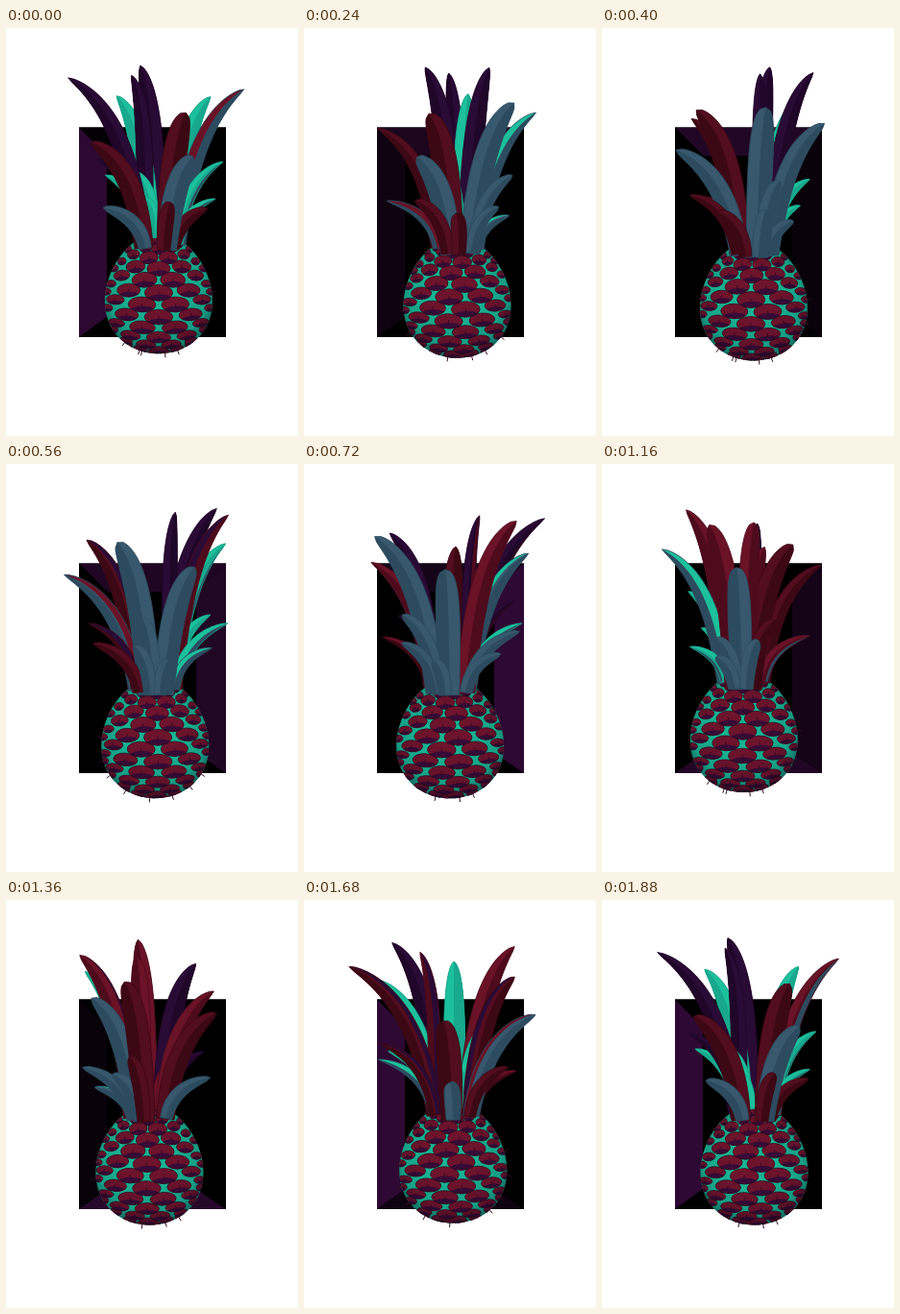
Animation, 304 px wide and 425 px high, one loop 1920 ms. Source, as an HTML page with a canvas:

```html
<!DOCTYPE html>
<html lang="en">
<head>
<meta charset="utf-8">
<title>Pineapple</title>
<style>
html, body { margin: 0; width: 100%; height: 100%; overflow: hidden; background: #fff; }
canvas { display: block; width: 304px; height: 425px; }
</style>
</head>
<body>
<canvas id="stage" width="304" height="425"></canvas>
<script>
const ctx = document.getElementById('stage').getContext('2d');
const LOOP = 1920, STEP = 40, TAU = Math.PI * 2;
const { sin, cos, abs, min, max, PI, hypot } = Math;
const rad = d => d * PI / 180;
const clamp = (v, a, b) => min(b, max(a, v));
const wave = (t, peak) => cos((t - peak) / LOOP * TAU);

const C = {
  red: ['#6a1226', '#4e0b1c'],
  dark: ['#520d1e', '#3c0814'],
  purple: ['#2a0b36', '#200629'],
  teal: ['#1cc09c', '#17a88d'],
  blue: ['#37586d', '#2d4b5f']
};

// start angle, reach, tip height, tip sway, width, inner face, outer face
const leaves = [
  [209, 106, 63, 23, 27, 'purple', 'dark'],
  [260, 79, 52, 13, 28, 'purple', 'red'],
  [5, 95, 62, 21, 29, 'red', 'blue'],
  [62, 68, 76, 14, 30, 'purple', 'dark'],
  [222, 31, 54, 7, 23, 'purple', 'red'],
  [140, 77, 106, 20, 28, 'dark', 'dark'],
  [65, 91, 111, 25, 27, 'red', 'blue'],
  [318, 89, 87, 23, 28, 'teal', 'blue'],
  [240, 82, 88, 20, 27, 'teal', 'blue'],
  [352, 76, 142, 19, 20, 'teal', 'blue'],
  [225, 75, 166, 18, 18, 'teal', 'blue'],
  [0, 66, 178, 12, 17, 'teal', 'blue'],
  [40, 70, 179, 14, 18, 'red', 'dark'],
  [135, 66, 180, 10, 19, 'red', 'blue'],
  [255, 79, 166, 17, 19, 'teal', 'blue'],
  [212, 72, 146, 18, 18, 'purple', 'dark'],
  [75, 66, 166, 16, 18, 'purple', 'dark'],
  [262, 62, 190, 13, 17, 'teal', 'blue'],
  [330, 62, 192, 13, 17, 'teal', 'blue']
];

function path(pts) {
  ctx.beginPath();
  for (const [x, y] of pts) ctx.lineTo(x, y);
  ctx.closePath();
}

function quad(color, ...pts) {
  path(pts);
  ctx.fillStyle = color;
  ctx.fill();
}

function drawRoom(t) {
  const L = 76, T = 103.5, R = 229, B = 322;
  const l = 105, u = 133, r = 198, d = 301;
  const tint = (peak, power) => {
    const k = max(0, wave(t, peak)) * power;
    return `rgb(${48 * k},${10 * k},${54 * k})`;
  };
  ctx.fillStyle = '#000';
  ctx.fillRect(L, T, R - L, B - T);
  quad(tint(440, 0.7), [L, T], [R, T], [r, u], [l, u]);
  quad(tint(1320, 0.8), [L, B], [R, B], [r, d], [l, d]);
  quad(tint(1780, 1), [L, T], [l, u], [l, d], [L, B]);
  quad(tint(820, 1), [R, T], [r, u], [r, d], [R, B]);
}

function drawSpike(x, y, dx, dy) {
  ctx.beginPath();
  ctx.moveTo(x, y);
  ctx.lineTo(x + dx, y + dy);
  ctx.strokeStyle = '#35091f';
  ctx.lineWidth = 1;
  ctx.stroke();
}

function drawScale({ x, y, w, h, n, nx, tilt }) {
  const disc = () => {
    ctx.beginPath();
    ctx.ellipse(x, y, w, h, tilt, 0, TAU);
  };
  disc();
  ctx.fillStyle = '#6e132c';
  ctx.fill();
  ctx.save();
  ctx.clip();
  ctx.beginPath();
  ctx.ellipse(x + w * 0.1, y + h * 1.2, w * 1.15, h, tilt, 0, TAU);
  ctx.fillStyle = '#370b36';
  ctx.fill();
  ctx.restore();
  disc();
  ctx.strokeStyle = '#2a0719';
  ctx.lineWidth = 0.7;
  ctx.stroke();
  if (n > 0.35) drawSpike(x, y - 1, nx * 2, 3);
}

function drawBody(cx, cy, turn) {
  const rx = 55, ry = 62, pitch = 0.23, PER_ROW = 10;
  const cp = cos(pitch), sp = sin(pitch);
  const egg = v => rx * (1 + 0.13 * v);
  const scales = [];
  for (let row = 0; row < 13; row++) {
    const lat = rad(-70 + row * 12);
    for (let i = 0; i < PER_ROW; i++) {
      const a = turn + (i + (row % 2) / 2) * TAU / PER_ROW;
      const px = cos(a) * cos(lat), pz = sin(a) * cos(lat), py = sin(lat);
      const n = pz * cp + py * sp;
      const sy = -py * cp + pz * sp;
      if (n < -0.05) continue;
      scales.push({
        x: cx + egg(sy) * px, y: cy + ry * sy, n, nx: px, ny: sy,
        w: 14 * cos(lat) * max(0.3, sin(a)) + 1,
        h: 8.2 * max(0.45, hypot(n, 0.25)),
        tilt: -px * sy * 0.5,
        spike: i % 2 === row % 2
      });
    }
  }
  scales.sort((p, q) => p.n - q.n);

  const outline = grow => {
    const pts = [];
    for (let a = 0; a < TAU; a += 0.05) {
      pts.push([cx + (egg(sin(a)) + grow) * cos(a), cy + (ry + grow) * sin(a)]);
    }
    path(pts);
  };

  for (const s of scales) {
    if (s.spike && s.n < 0.25 && s.ny > -0.4) {
      const ex = cx + egg(s.ny) * s.nx / hypot(s.nx, s.ny);
      const ey = cy + ry * s.ny / hypot(s.nx, s.ny);
      drawSpike(ex, ey, s.nx * 5, s.ny * 5);
    }
  }
  ctx.save();
  outline(0.5);
  ctx.fillStyle = '#18b494';
  ctx.fill();
  ctx.clip();
  scales.forEach(drawScale);
  const shade = ctx.createRadialGradient(cx - 4, cy - 8, 26, cx, cy, 66);
  shade.addColorStop(0, 'rgba(10,0,20,0)');
  shade.addColorStop(0.65, 'rgba(10,0,20,.12)');
  shade.addColorStop(1, 'rgba(10,0,20,.5)');
  outline(1);
  ctx.fillStyle = shade;
  ctx.fill();
  ctx.restore();
}

function drawLeaf([start, reach, tipY, sway, width, inner, outer], bx, by, turn) {
  const a = rad(start) + turn, c = cos(a), s = sin(a);
  const front = max(0, s);
  const far = reach * c * (1 + 0.12 * s);
  const x0 = bx + 20 * c, y0 = by + 7 * s;
  const x2 = 152 + far, y2 = tipY + sway * s;
  const x1 = bx + far * 0.3 + 6 * c, y1 = y0 + (y2 - y0) * 0.8;
  const half = width / 2 * (0.72 + 0.28 * abs(s));
  const N = 24, left = [], mid = [], right = [], split = [];
  const inPart = clamp(0.58 - s * 1.15, 0, 1);
  const side = c >= 0 ? 1 : -1;

  for (let i = 0; i <= N; i++) {
    const k = i / N, m = 1 - k;
    const x = m * m * x0 + 2 * m * k * x1 + k * k * x2;
    const y = m * m * y0 + 2 * m * k * y1 + k * k * y2;
    const tx = m * (x1 - x0) + k * (x2 - x1);
    const ty = m * (y1 - y0) + k * (y2 - y1);
    const len = hypot(tx, ty) || 1;
    const w = half * (0.75 + 0.95 * k) * Math.pow(m, 0.72 - 0.25 * front);
    const nx = ty / len * w * side, ny = -tx / len * w * side;
    const at = q => [x + nx * q, y + ny * q];
    left.push(at(1));
    right.push(at(-1));
    mid.push(at(0.05));
    split.push(at(1 - 2 * inPart));
  }
  const strip = (p, q) => path(p.concat([...q].reverse()));
  const fill = color => { ctx.fillStyle = color; ctx.fill(); };

  strip(left, right);
  fill(C[outer][0]);
  strip(mid, right);
  fill(C[outer][1]);
  if (inPart > 0) {
    strip(left, split);
    fill(C[inner][0]);
    if (inPart > 0.6) {
      strip(mid, split);
      fill(C[inner][1]);
    }
  }
  strip(left, right);
  ctx.strokeStyle = C[s > 0 ? outer : inner][1];
  ctx.lineWidth = 0.8;
  ctx.lineJoin = 'round';
  ctx.stroke();
}

function draw(t) {
  const turn = t / LOOP * TAU;
  const cx = 153.7 + 6 * wave(t, 160);
  const cy = 280 + 6 * wave(t, 660);
  ctx.clearRect(0, 0, 304, 425);
  drawRoom(t);
  drawBody(cx, cy, turn);
  const depth = l => sin(rad(l[0]) + turn) + l[2] / 260;
  [...leaves].sort((p, q) => depth(p) - depth(q))
    .forEach(l => drawLeaf(l, cx, cy - 52, turn));
}

function tick() {
  const t = performance.now() % LOOP;
  draw(Math.floor(t / STEP) * STEP);
  requestAnimationFrame(tick);
}
tick();
</script>
</body>
</html>
```
